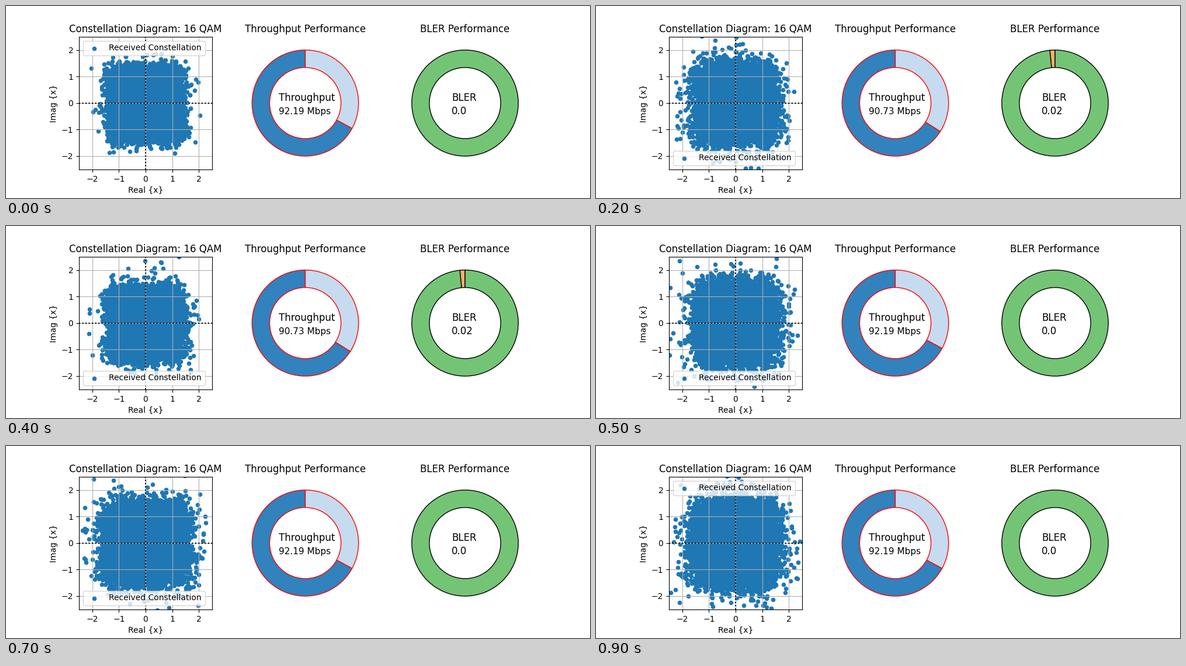
Write a matplotlib script that moves like this. It is 1000 px wide and 330 px high and loops after 1000 ms.

```python
import matplotlib.pyplot as plt
import numpy as np
from matplotlib.animation import FuncAnimation

STEP_MS = 100
POINTS = 14000
PEAK_MBPS = 137.4
BLOCK_LOSS = 1 / 64

# channel noise in each time slot
NOISE = [0.195, 0.40, 0.26, 0.26, 0.19, 0.27, 0.325, 0.29, 0.28, 0.325]
LEGEND_TOP = {0: "upper left", 1: "upper center", 9: "upper left"}


def received(slot):
    """16 QAM symbols with fading: Student-t noise with 7 degrees of freedom."""
    rng = np.random.default_rng(40 + slot)
    levels = np.array([-3, -1, 1, 3]) / np.sqrt(10)
    fading = np.sqrt(7 / rng.chisquare(7, (POINTS, 1)))
    noise = NOISE[slot] * fading * rng.normal(size=(POINTS, 2))
    return rng.choice(levels, (POINTS, 2)) + noise


def draw_constellation(ax, pts, loc):
    ax.clear()
    ax.scatter(*pts.T, s=20, color="tab:blue", label="Received Constellation")
    ax.axhline(0, color="k", ls=":")
    ax.axvline(0, color="k", ls=":")
    ax.set(xlim=(-2.5, 2.5), ylim=(-2.5, 2.5), aspect="equal",
           xticks=range(-2, 3), yticks=range(-2, 3),
           xlabel="Real {x}", ylabel="Imag {x}",
           title="Constellation Diagram: 16 QAM")
    ax.grid(True)
    ax.legend(loc=loc)


def draw_ring(ax, share, colors, edge, name, x, value, size):
    """Ring chart with the first share running left from the top."""
    ax.clear()
    parts = [(s, c) for s, c in zip((share, 1 - share), colors) if s > 0]
    shares, fills = zip(*parts)
    ax.pie(shares, colors=fills, startangle=90,
           wedgeprops=dict(width=0.33, edgecolor=edge))
    ax.text(x, 0.04, name, fontsize=12)
    ax.text(x, -0.21, value, fontsize=size)
    ax.set_title(f"{name} Performance")


fig, (ax_iq, ax_rate, ax_bler) = plt.subplots(1, 3, figsize=(10, 3.3), dpi=100)
fig.subplots_adjust(bottom=0.1095, top=0.8795)


def update(slot):
    rate, bler = (90.73, BLOCK_LOSS) if 2 <= slot <= 4 else (92.19, 0.0)
    draw_constellation(ax_iq, received(slot),
                       LEGEND_TOP.get(slot, "lower left"))
    draw_ring(ax_rate, rate / PEAK_MBPS, ("#3182bd", "#c6dbef"), "red",
              "Throughput", -0.5, f"{rate:.2f} Mbps", 11)
    draw_ring(ax_bler, bler, ("#fdae6b", "#74c476"), "black",
              "BLER", -0.25, f"{round(bler, 2)}", 12)
    return []


anim = FuncAnimation(fig, update, frames=len(NOISE), interval=STEP_MS,
                     init_func=lambda: [], repeat=True, repeat_delay=0)
plt.show()
```
